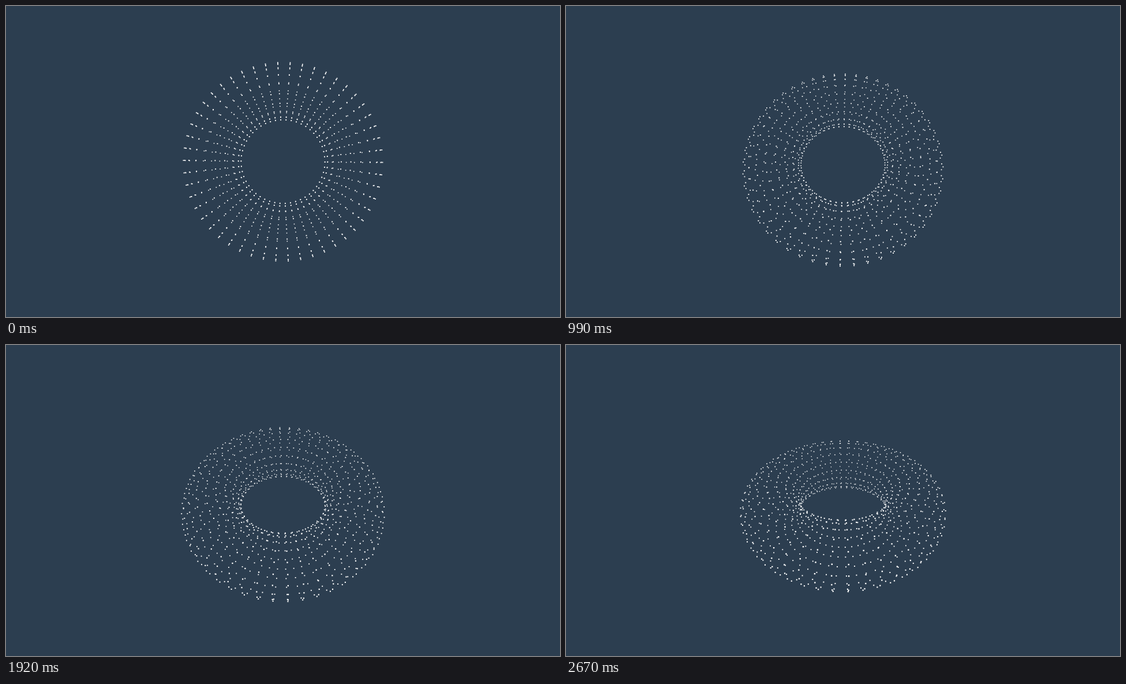
Write an HTML page with a canvas that moves like this. It is 960 px wide and 540 px high and loops after 2700 ms.

```html
<!DOCTYPE html>
<html lang="en">
<head>
<meta charset="utf-8">
<title>Dotted torus</title>
<style>
  html, body { margin: 0; width: 100%; height: 100%; overflow: hidden; background: #2c3e50; }
  canvas { display: block; }
</style>
</head>
<body>
<canvas id="stage" width="960" height="540"></canvas>
<script>
const ctx = document.getElementById('stage').getContext('2d');
const WIDTH = 960, HEIGHT = 540;
const LOOP = 2700, STEP = 30, TURN = 0.01;
const RING = 121, TUBE = 48.4, SPOKES = 50, SIDES = 20;
const FOCAL = HEIGHT / 2 / Math.tan(Math.PI / 6);
const DOT = 1.7;

// Torus lying in the screen plane, z pointing towards the viewer
const points = [];
for (let i = 0; i < SPOKES; i++) {
  for (let k = 0; k < SIDES; k++) {
    const v = k / SIDES * 2 * Math.PI;
    points.push({
      u: i / SPOKES * 2 * Math.PI,
      radius: RING + TUBE * Math.cos(v),
      z: TUBE * Math.sin(v)
    });
  }
}

function draw(time) {
  const angle = TURN * (Math.floor(time % LOOP / STEP) + 1);
  const c = Math.cos(angle), s = Math.sin(angle);
  ctx.fillStyle = '#2c3e50';
  ctx.fillRect(0, 0, WIDTH, HEIGHT);
  ctx.fillStyle = '#fff';
  for (const { u, radius, z } of points) {
    // Spin about the torus axis, then tip the lower edge forward
    const x = radius * Math.cos(u + angle);
    const y = radius * Math.sin(u + angle);
    const scale = FOCAL / (FOCAL - (y * s + z * c));
    const size = DOT * scale;
    ctx.fillRect(
      WIDTH / 2 + x * scale - size / 2,
      HEIGHT / 2 + (y * c - z * s) * scale - size / 2,
      size, size
    );
  }
}

const start = performance.now();
function tick() {
  draw(performance.now() - start);
  requestAnimationFrame(tick);
}
tick();
</script>
</body>
</html>
```
